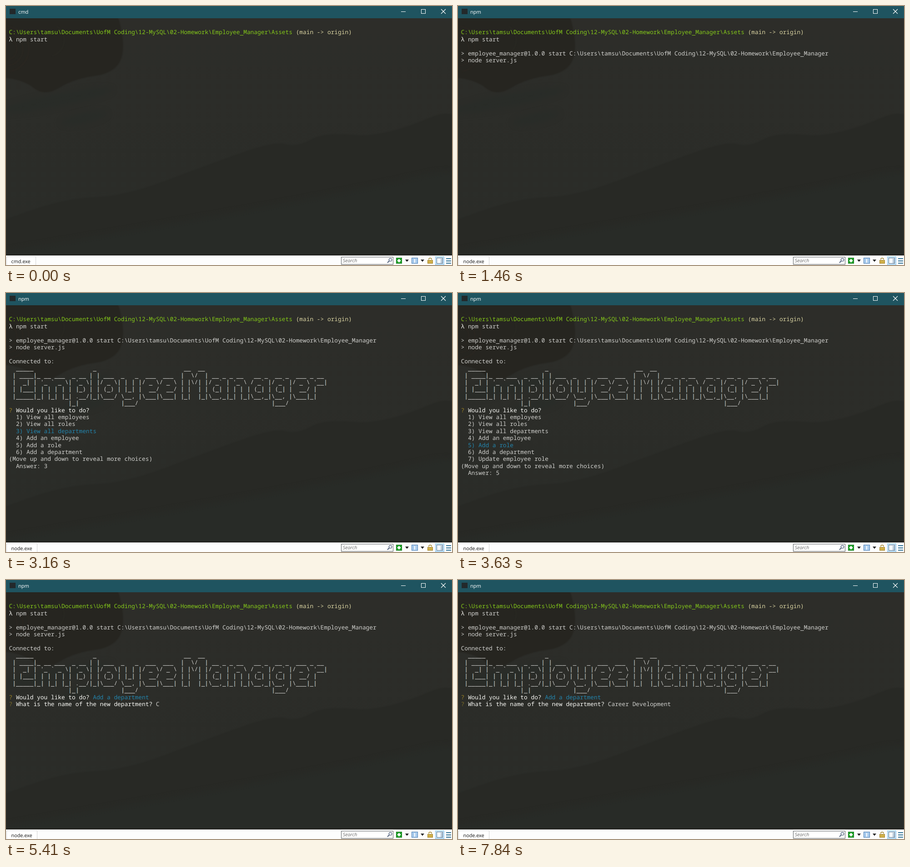
Write an HTML page with a canvas that moves like this. It is 981 px wide and 571 px high and loops after 8000 ms.

```html
<!DOCTYPE html>
<html lang="en">
<head>
<meta charset="utf-8">
<title>Terminal</title>
<style>
  html, body { margin: 0; width: 100%; height: 100%; overflow: hidden; background: #2b2c28; }
  canvas { display: block; }
</style>
</head>
<body>
<canvas id="stage" width="981" height="571"></canvas>
<script>
const W = 981, H = 571, LOOP = 8000;
const CELL = 7.697, ROW = 15.4, LEFT = 6.5, BASE = 62.4;
const MONO = '12.83px "Noto Sans Mono", "DejaVu Sans Mono", monospace';
const UI = '"Open Sans", "Noto Sans", sans-serif';
const GREY = '#d0d0cd', WHITE = '#fafaf6', GREEN = '#84c81a', CREAM = '#d8d2a0',
      BLUE = '#2384ac', MARK = '#9a8024', DIM = '#7d6c28';

const ctx = document.getElementById('stage').getContext('2d');
const HOME = 'C:\\Users\\tamsu\\Documents\\UofM Coding\\12-MySQL\\02-Homework\\Employee_Manager';

// "~" stands for a backtick
const BANNER = String.raw`
  _____                 _                         __  __
 | ____|_ __ ___  _ __ | | ___  _   _  ___  ___  |  \/  | __ _ _ __   __ _  __ _  ___ _ __
 |  _| | '_ ~ _ \| '_ \| |/ _ \| | | |/ _ \/ _ \ | |\/| |/ _~ | '_ \ / _~ |/ _~ |/ _ \ '__|
 | |___| | | | | | |_) | | (_) | |_| |  __/  __/ | |  | | (_| | | | | (_| | (_| |  __/ |
 |_____|_| |_| |_| .__/|_|\___/ \__, |\___|\___| |_|  |_|\__,_|_| |_|\__,_|\__, |\___|_|
                 |_|            |___/                                      |___/
`.replace(/~/g, '\x60').split('\n').slice(1, 7);

const CHOICES = ['View all employees', 'View all roles', 'View all departments', 'Add an employee',
  'Add a role', 'Add a department', 'Update employee role', "Update an Employee's Manager"];
const REPLY = 'Career Development';

const START = 1460, READY = 1840, ENTER = 4410, ASK = 4480;
const DOWN_KEYS = [2930, 3160, 3310, 3630, 3860];

// steady typing, a little slower at first and faster near the end
const keyTime = i => 5410 + 143 * i + 65 * Math.sin(i / 17 * 2 * Math.PI);

function box(c, x, y, w, h, fill, line) {
  c.fillStyle = line || fill;
  c.fillRect(x, y, w, h);
  if (line) {
    c.fillStyle = fill;
    c.fillRect(x + 1, y + 1, w - 2, h - 2);
  }
}

function stroke(c, color, width, x1, y1, x2, y2) {
  c.strokeStyle = color;
  c.lineWidth = width;
  c.beginPath();
  c.moveTo(x1, y1);
  c.lineTo(x2, y2);
  c.stroke();
}

function arc(c, color, width, x, y, r, from = 0, to = 7) {
  c.strokeStyle = color;
  c.lineWidth = width;
  c.beginPath();
  c.arc(x, y, r, from, to);
  c.stroke();
}

function arrow(c, x, y) {
  c.fillStyle = '#222';
  c.beginPath();
  c.moveTo(x, y);
  c.lineTo(x + 8, y);
  c.lineTo(x + 4, y + 5);
  c.fill();
}

function label(c, text, x, y, color, font) {
  c.font = font;
  c.fillStyle = color;
  c.textRendering = 'geometricPrecision';
  c.fillText(text, x, y);
}

// rounded path through the middles of the given points
function blob(c, color, points) {
  const mid = (a, b) => [(a[0] + b[0]) / 2, (a[1] + b[1]) / 2];
  c.fillStyle = color;
  c.beginPath();
  points.forEach((p, i) => {
    c.quadraticCurveTo(...p, ...mid(p, points[(i + 1) % points.length]));
  });
  c.fill();
}

function smudge(c, x, y, rx, ry, tilt) {
  c.fillStyle = '#292c28';
  c.beginPath();
  c.ellipse(x, y, rx, ry, tilt, 0, 7);
  c.fill();
}

function wallpaper(c) {
  const sky = c.createLinearGradient(0, 27, 0, 549);
  sky.addColorStop(0, '#2d2d29');
  sky.addColorStop(1, '#2a2c28');
  box(c, 0, 0, W, H, sky);

  c.filter = 'blur(1.2px)';
  blob(c, '#282925', [[-40, 485], [130, 424], [260, 420], [440, 352], [590, 298], [640, 312],
    [700, 278], [830, 291], [1040, 200], [1040, 640], [-40, 640]]);
  c.filter = 'blur(6px)';
  blob(c, '#282b27', [[-60, 550], [420, 470], [800, 400], [1060, 340], [1060, 660], [-60, 660]]);
  smudge(c, 110, 208, 125, 14, -.19);
  smudge(c, 172, 247, 50, 11, -.22);

  c.filter = 'blur(1.2px)';
  blob(c, '#262520', [[-60, -20], [235, -20], [264, 90], [240, 148], [150, 160],
    [85, 200], [35, 160], [-60, 155]]);
  for (let r = 24; r < 52; r += 13) arc(c, '#2b2721', 2, 0, 95, r, -1.5, 1.4);
  arc(c, '#2a2923', 2, 92, 75, 36, -1, 1.3);
  c.filter = 'none';
}

function titleBar(c) {
  box(c, 0, 0, W, 27, '#1f5460');
  box(c, 8, 6, 13, 12, '#23292b');
  box(c, 869, 12, 10, 1, '#fff');
  c.strokeStyle = '#fff';
  c.lineWidth = 1;
  c.strokeRect(913.5, 7.5, 9, 9);
  stroke(c, '#fff', 1.1, 957, 7, 967, 17);
  stroke(c, '#fff', 1.1, 967, 7, 957, 17);
}

function statusBar(c) {
  box(c, 0, 547, W, 3, '#242521');
  box(c, 0, 550, W, 21, '#fdfdfd');

  box(c, 737, 553, 115, 17, '#fff', '#5c6064');
  label(c, 'Search', 741, 565, '#6d6d6d', 'italic 10.6px ' + UI);
  arc(c, '#4b5b78', 1.3, 845.5, 559.5, 3.2);
  stroke(c, '#4b5b78', 1.8, 843, 562, 839, 566);

  box(c, 858, 555, 13, 13, '#22a02c', '#137a1b');
  box(c, 861, 560, 7, 3, '#fff');
  box(c, 863, 558, 3, 7, '#fff');
  arrow(c, 878, 559);

  box(c, 892, 555, 14, 13, '#a9cbec', '#4b7db5');
  box(c, 898, 558, 2, 8, '#fff');
  arrow(c, 912, 559);

  arc(c, '#a88d3a', 1.6, 933, 559, 3.2, Math.PI, 0);
  box(c, 927, 560, 12, 8, '#d0b04a', '#a28430');

  box(c, 944, 552, 20, 19, '#cbe6f9', '#8ec6ee');
  box(c, 947, 555, 14, 13, '#f6f9fb', '#5a7590');
  box(c, 956, 557, 4, 10, '#b9cbda');
  for (let y = 556; y < 570; y += 5) box(c, 968, y, 11, 2, '#2f7195');
}

const rowY = row => Math.round(BASE + row * ROW);

function write(text, col, row, color) {
  ctx.font = MONO;
  ctx.fillStyle = color;
  [...text].forEach((ch, i) => {
    const drop = ch === '_' ? 1 : 0;
    if (ch !== ' ') ctx.fillText(ch, LEFT + (col + i) * CELL, rowY(row) + drop);
  });
}

// thin bars carry a cool left and a warm right fringe
function bannerLine(text, row) {
  write(text.replace(/\|/g, ' '), 0, row, GREY);
  [...text].forEach((ch, i) => {
    if (ch !== '|') return;
    const x = Math.round(LEFT + (i + .5) * CELL) - CELL / 2;
    ctx.fillStyle = '#6fa5c8';
    ctx.fillText(ch, x - .5, rowY(row));
    ctx.fillStyle = '#b9946a';
    ctx.fillText(ch, x + .5, rowY(row));
  });
}

function menu(t) {
  const chosen = 1 + DOWN_KEYS.filter(k => k <= t).length;
  const first = Math.max(1, chosen - 4), last = Math.max(6, chosen + 2);
  let row = 14;
  for (let n = first; n <= last; n++) {
    write(`${n}) ${CHOICES[n - 1]}`, 2, row++, n === chosen ? BLUE : GREY);
  }
  write('(Move up and down to reveal more choices)', 0, row++, GREY);
  if (t < ENTER) write('Answer: ' + (chosen > 1 ? chosen : ''), 2, row, GREY);
}

function titles(t) {
  const title = t < 840 ? 'cmd' : t < 920 ? 'cmd - npm\u00a0 start' : 'npm';
  label(ctx, title, 27, 17, '#fff', '11.1px ' + UI);
  const node = t >= 1150;
  box(ctx, 1, 552, node ? 68 : 65, 20, '#fff', '#d4d4d4');
  label(ctx, node ? 'node.exe' : 'cmd.exe', 11.5, 567, '#111', '10.8px ' + UI);
}

function draw(t) {
  ctx.drawImage(back, 0, 0);
  titles(t);
  const path = HOME + '\\Assets';
  write(path, 0, 0, GREEN);
  write('(main -> origin)', path.length + 1, 0, CREAM);
  write('λ', 0, 1, WHITE);
  write('npm start', 2, 1, GREY);
  if (t < START) return;
  write('> employee_manager@1.0.0 start ' + HOME, 0, 3, GREY);
  write('> node server.js', 0, 4, GREY);
  if (t < READY) return;
  write('Connected to:', 0, 6, GREY);
  BANNER.forEach((line, i) => bannerLine(line, 7 + i));
  write('?', 0, 13, MARK);
  write('Would you like to do?', 2, 13, WHITE);
  if (t < ASK) return menu(t);
  write('Add a department', 24, 13, BLUE);
  write('?', 0, 14, DIM);
  write('What is the name of the new department?', 2, 14, WHITE);
  const typed = [...REPLY].filter((_, i) => keyTime(i) <= t).join('');
  write(typed, 42, 14, GREY);
}

const back = document.createElement('canvas');
back.width = W;
back.height = H;
const bc = back.getContext('2d');
wallpaper(bc);
titleBar(bc);
statusBar(bc);

const begin = performance.now();
function tick() {
  draw((performance.now() - begin) % LOOP);
  requestAnimationFrame(tick);
}
tick();
</script>
</body>
</html>
```
